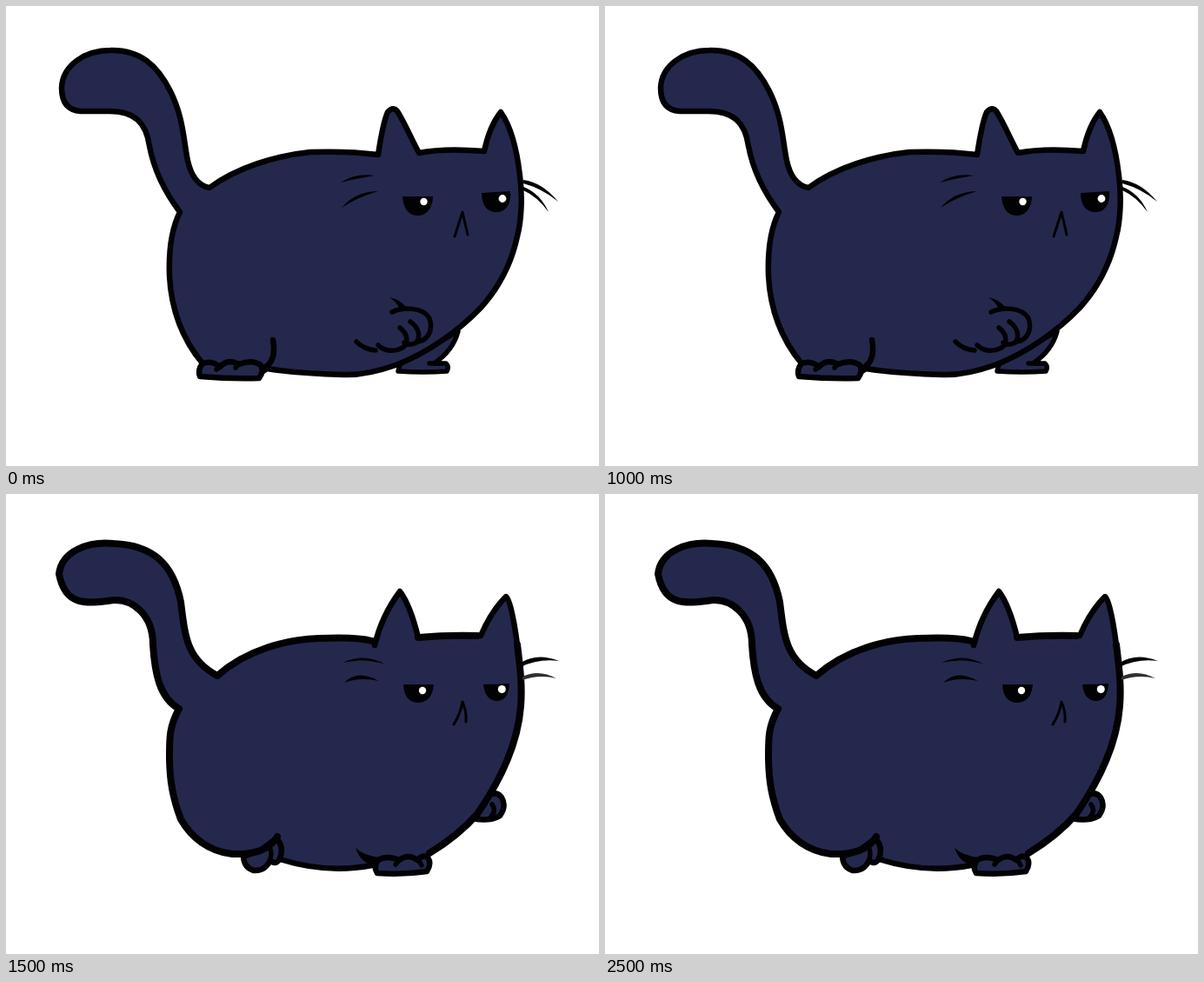
Animation, 682 px wide and 529 px high, one loop 3 s. Source, as an HTML page:

```html
<!DOCTYPE html>
<html lang="en">
<head>
<meta charset="utf-8">
<title>Walking cat</title>
<style>
  html, body { margin: 0; width: 100%; height: 100%; overflow: hidden; background: #fff; }
  svg { display: block; width: 682px; height: 529px; }
  path { fill: none; stroke: #020204; stroke-width: 6.5; stroke-linecap: round; stroke-linejoin: round; }
  .fur { fill: #25284d; stroke: none; }
  .skin { fill: #25284d; }
  .ink { fill: #020204; stroke: none; }
  .mid { stroke-width: 5.5; }
  .thin { stroke-width: 3; }
  .bold { stroke-width: 8; }
  .soft { fill: #303034; stroke: none; }
  circle { fill: #fff; }
</style>
</head>
<body>
<svg viewBox="0 0 682 529">
  <g id="lifted">
    <!-- far front leg -->
    <path class="skin mid" d="M520 374C516 389 506 402 492 411L506 411Q510 415 507 420Q480 422 451 420L453 412Z"/>
    <path class="mid" d="M487 411L500 411"/>
    <!-- body, head and tail -->
    <path class="skin" d="M234 209C265 186 310 172 350 168C380 167 405 168 428 171
      C431 151 434 133 439 122Q445 115 450 121C460 137 467 155 475 169
      C500 164 526 165 550 167C554 148 561 132 569 122C581 139 588 169 591 195
      C594 218 593 246 588 265C581 297 566 325 546 347C520 374 485 399 448 413
      C428 420 408 425 388 424C355 423 325 421 300 417L294 421L226 411
      C202 382 190 350 188 310C187 282 191 255 200 237
      C182 213 170 188 165 161C161 134 148 121 119 121L86 121
      C71 120 64 111 64 94C65 68 91 51 120 51C154 50 174 68 189 98
      C204 128 204 153 209 178C213 196 222 207 234 209Z"/>
    <!-- hind foot -->
    <path class="skin" d="M226 411Q220 419 223 426Q258 429 291 428Q297 420 293 413
      Q283 406 268 412Q255 405 246 415Q237 407 226 411Z"/>
    <path class="mid" d="M246 415L242 418M268 411L264 416"/>
    <path d="M307 384C310 400 306 411 297 416"/>
    <!-- raised paw -->
    <path class="mid" d="M444 352C457 346 479 346 487 359C492 374 484 385 473 386"/>
    <path class="mid" d="M465 363C475 370 477 380 472 387C464 391 460 389 458 387
      M453 370C463 378 463 388 456 393C445 399 434 396 428 390M425 396Q412 395 403 386"/>
    <path class="ink" d="M441 335Q454 338 460 346L453 349Q450 341 441 335Z"/>
    <!-- face -->
    <path class="ink" d="M456 219L491 219C491 233 483 242 472 241C462 240 457 232 456 219Z
      M547 215L580 213C581 228 575 237 564 237C553 237 547 229 547 215Z"/>
    <circle cx="480.5" cy="225" r="4.2"/>
    <circle cx="571" cy="221.5" r="4.4"/>
    <path class="thin" d="M516 265L525 237L531 263"/>
    <path class="ink" d="M385 203Q401 192 424 195Q405 198 385 203Z
      M386 232Q402 213 428 213Q406 219 386 232Z
      M595 200Q617 203 635 225Q617 210 595 204Z
      M595 208Q614 215 624 237Q611 219 595 212Z"/>
  </g>

  <g id="planted">
    <!-- far front paw -->
    <path class="skin" d="M552 347Q565 341 570 349Q576 359 568 370Q556 377 537 373Z"/>
    <path class="mid" d="M559 357Q565 365 556 373"/>
    <!-- body, head and tail -->
    <path class="fur" d="M243 209C278 178 325 167 360 166L423 169L428 154Q437 131 453 112
      Q466 130 474 165L545 164Q557 136 575 118Q581 121 588 173C591 198 594 220 592 244
      C589 284 571 326 542 368Q520 393 487 413L480 425L428 427Q377 437 315 420L312 394
      C303 409 285 415 260 414C233 411 213 395 201 374C188 342 187 310 188 290
      C189 271 192 257 199 247C176 234 171 205 169 173C169 139 146 121 124 122
      C90 127 68 128 61 92C64 65 96 54 124 57C169 59 192 80 201 124
      C206 165 208 190 243 209Z"/>
    <path d="M315 420Q369 437 421 427"/>
    <!-- hind paw -->
    <path class="skin" d="M311 396Q321 407 314 421Q309 427 304 421Q298 434 285 433Q274 430 273 417L292 410Z"/>
    <path class="mid" d="M303 406Q307 414 303 422"/>
    <!-- outline -->
    <path class="bold" d="M199 247C176 234 171 205 169 173C169 139 146 121 124 122
      C90 127 68 128 61 92C64 65 96 54 124 57C169 59 192 80 201 124
      C206 165 208 190 243 209C278 178 325 167 360 166Q403 164 421 169"/>
    <path d="M424 174Q432 140 453 112Q465 128 474 165"/>
    <path class="bold" d="M474 165Q508 162 542 163"/>
    <path d="M546 163Q558 135 575 118Q581 121 588 173"/>
    <path class="bold" d="M588 173C591 198 594 220 592 244C589 284 571 326 542 368Q520 393 487 413"/>
    <path class="bold" d="M199 247C188 267 188 280 188 300C188 330 192 350 201 374
      C213 395 233 411 260 414C285 415 303 409 312 394"/>
    <!-- near front paw -->
    <path class="skin" d="M428 421Q422 429 427 436Q457 438 484 434Q490 425 485 418
      Q479 414 473 421Q463 413 452 421Q438 415 428 421Z"/>
    <path class="mid" d="M452 421L448 426M474 420L478 427"/>
    <path class="ink" d="M402 407Q411 416 431 418L424 427Q408 425 402 407Z"/>
    <!-- face -->
    <path class="ink" d="M457 219L492 219Q490 240 473 240Q458 239 457 219Z
      M549 219L579 218Q578 238 564 238Q551 237 549 219Z"/>
    <circle cx="479" cy="226" r="4.2"/>
    <circle cx="570.3" cy="224.5" r="4.5"/>
    <path class="thin" d="M515 265Q523 252 525 239Q530 250 529 262"/>
    <path class="ink" d="M387 194Q413 182 436 196Q413 188 387 194Z
      M389 217Q404 201 429 215Q407 210 389 217Z
      M592 194Q611 182 636 192Q612 189 592 199Z"/>
    <path class="soft" d="M594 210Q613 201 633 212Q613 207 594 214Z"/>
  </g>
</svg>
<script>
  const STEP = 500;
  const poses = ["lifted", "planted"];
  const startTime = document.timeline.currentTime || 0;

  // Each pose holds for one step, then switches without a blend.
  poses.forEach((id, i) => {
    const shown = i === 0 ? 1 : 0;
    const walk = document.getElementById(id).animate([
      { opacity: shown, offset: 0, easing: "steps(1, end)" },
      { opacity: 1 - shown, offset: 0.5, easing: "steps(1, end)" },
      { opacity: shown, offset: 1 }
    ], { duration: STEP * poses.length, iterations: Infinity });
    walk.startTime = startTime;
  });
</script>
</body>
</html>
```
